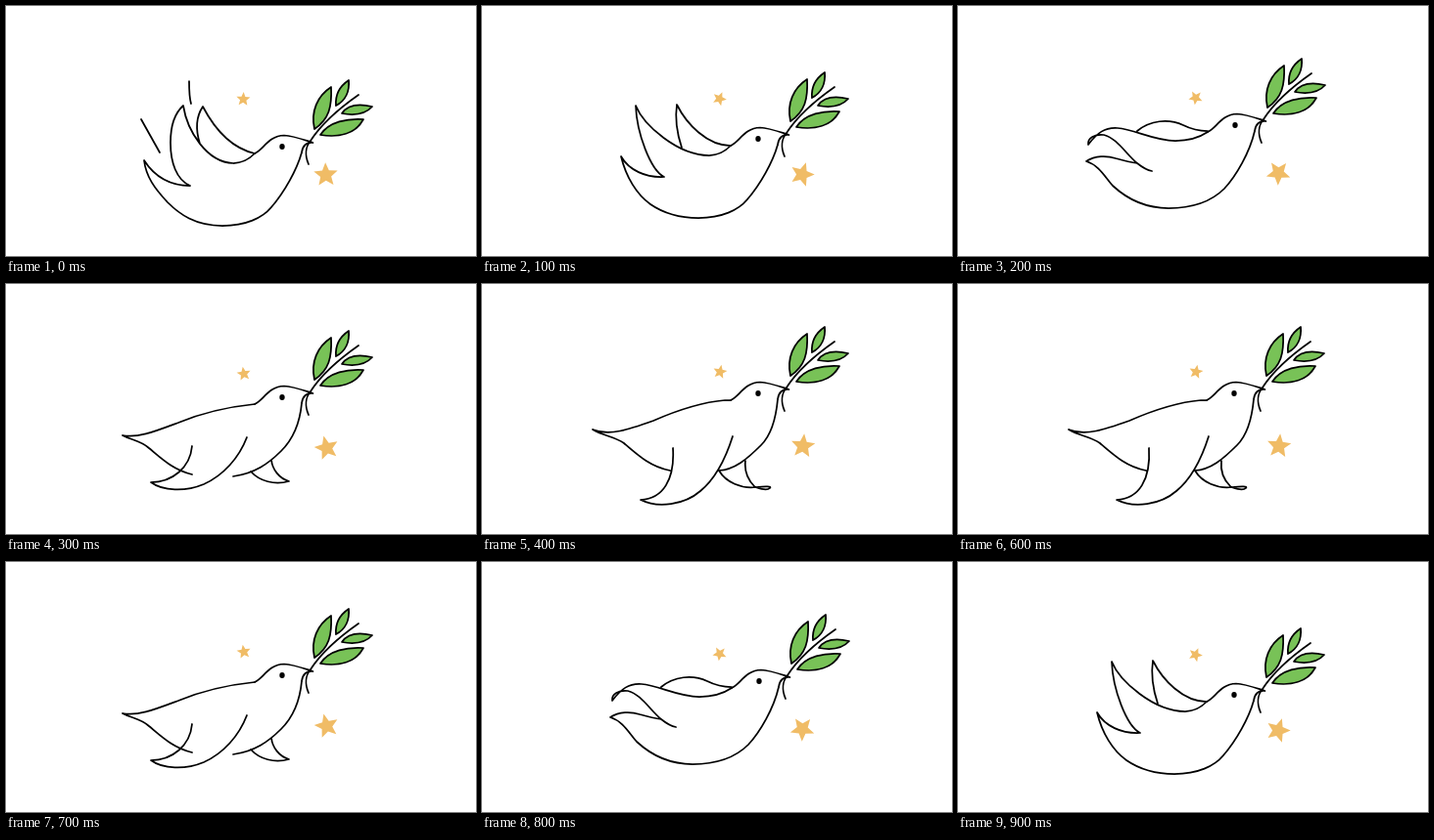
An HTML page for the animation above (1000 ms loop, 480 by 256 pixels).

```html
<!DOCTYPE html>
<html lang="en">
<head>
<meta charset="utf-8">
<title>Dove</title>
<style>
html, body { margin: 0; width: 100%; height: 100%; overflow: hidden; background: #fff; }
svg { display: block; width: 100vw; height: 100vh; }
.ink { fill: none; stroke: #000; stroke-width: 1.75; stroke-linecap: round; stroke-linejoin: round; }
.leaf { fill: #78c257; }
.star { fill: #f0bc66; }
</style>
</head>
<body>
<svg viewBox="0 0 480 256">
  <polygon class="star" id="small"/>
  <polygon class="star" id="big"/>
  <path class="ink" id="body"/>
  <g class="ink" id="head">
    <path d="M254 151C263 147 268 133 284 132.5C294 133 304 137 313.5 140C307 139 303 143 302 150"/>
    <path d="M309 162C305 153 306 144 311 138C322 121 340 105 360 91"/>
    <path class="leaf" d="M315 126C311 108 318 92 332 83C333 103 330 116 315 126Z"/>
    <path class="leaf" d="M337 102C336 90 341 82 350 76C351 87 347 97 337 102Z"/>
    <path class="leaf" d="M343 110C349 101 361 100 374 103C366 112 354 112 343 110Z"/>
    <path class="leaf" d="M321 132C330 118 349 115 365 116C357 131 340 135 321 132Z"/>
    <ellipse cx="282" cy="144" rx="2.7" ry="3" fill="#000" stroke="none"/>
  </g>
</svg>
<script>
const $ = id => document.getElementById(id);

// Wing stroke from raised to lowered: head offset, star heights, body outline
const poses = [
  { x: 0, y: 0, big: 173, small: 95.5, d: `
    M302 150C297 168 284 191 271 206C262 217 245 225 221 225C193 225 177 213 165 201C152 187 143 175 141 158
    C150 172 165 184 188 184C174 178 168 160 168 140C168 122 172 110 181 102C185 128 205 160 232 161C243 161 249 156 254 151
    M198 141C193 125 195 112 201 103C211 122 228 145 254 151
    M138 116L157 150M187 77C187 85 187 93 189 100` },
  { x: 0, y: -8, big: 172.5, small: 95, d: `
    M302 142C297 160 284 183 271 198C262 209 245 217 221 217C200 217 185 212 172 203C158 193 147 175 142 154
    C150 168 167 176 186 175C172 168 158 130 157 102C165 122 200 153 232 153C243 153 249 148 254 143
    M204 145C199 130 197 115 199 101C209 121 230 143 254 143` },
  { x: 1, y: -22, big: 171, small: 94, d: `
    M303 128C298 150 284 174 272 187C259 200 240 207 215 207C190 207 172 197 158 184C150 175 144 163 131 159
    C140 153 152 153 161 156C168 158 175 160 183 161
    M198 169C192 168 188 165 183 161C172 152 162 135 149 132C140 131 132 135 133 142C142 130 150 124 163 125
    C180 126 200 138 222 138C238 138 249 133 255 129
    M183 128C196 117 215 115 230 122C238 126 246 128 255 128` },
  { x: 0, y: -28, big: 168, small: 92, d: `
    M302 122C300 144 292 160 281 171C268 184 254 194 232 197M190 195C170 190 158 178 146 168C137 160 128 160 119 155
    C135 158 152 151 176 142C200 132 225 126 254 123
    M246 157C238 178 222 196 202 205C183 213 160 212 148 203C170 203 188 188 190 166
    M250 192C259 202 274 206 289 202C279 199 272 190 271 180` },
  { x: 0, y: -32, big: 166, small: 90, d: `
    M302 118C300 140 295 155 285 165C270 180 258 190 242 191M192 191C172 187 160 176 145 163C135 156 125 156 113 149
    C130 156 150 149 175 140C200 129 225 121 248 119L254 119
    M256 156C250 175 240 198 223 212C207 226 180 230 162 221C185 220 197 200 195 168
    M242 191C249 203 265 210 280 208C290 207 296 207 294 209C291 212 280 209 278 207C271 200 268 190 269 181` },
  { x: 0, y: -37, big: 164, small: 89, d: `
    M302 113C300 135 295 151 285 161C272 174 260 185 245 188M196 189C174 185 160 173 144 159C134 152 123 151 110 145
    C129 152 150 145 175 136C200 125 225 116 248 114L254 114
    M260 155C256 179 248 205 232 221C217 236 192 241 173 234C194 230 203 206 199 166
    M245 188C252 204 265 214 284 217C291 218 292 215 285 213C275 206 270 193 271 177` }
];

function starPoints(cx, cy, r, turn) {
  return Array.from({ length: 10 }, (_, i) => {
    const a = (turn + i * 36) * Math.PI / 180;
    const k = i % 2 ? r * 0.45 : r;
    return `${cx + k * Math.sin(a)},${cy - k * Math.cos(a)}`;
  }).join(" ");
}

function draw(now) {
  const step = Math.floor(now / 100) % 10;
  const n = Math.min(step, 10 - step);
  const p = poses[n];
  $("body").setAttribute("d", p.d);
  $("head").setAttribute("transform", `translate(${p.x} ${p.y})`);
  $("big").setAttribute("points", starPoints(326.6 + n * 0.3, p.big, 12.8, n * 20 - 2));
  $("small").setAttribute("points", starPoints(242.3 + n * 0.2, p.small, 7.4, n * 20 + 3));
}

const start = performance.now();
function tick() {
  draw(performance.now() - start);
  requestAnimationFrame(tick);
}
tick();
</script>
</body>
</html>
```
